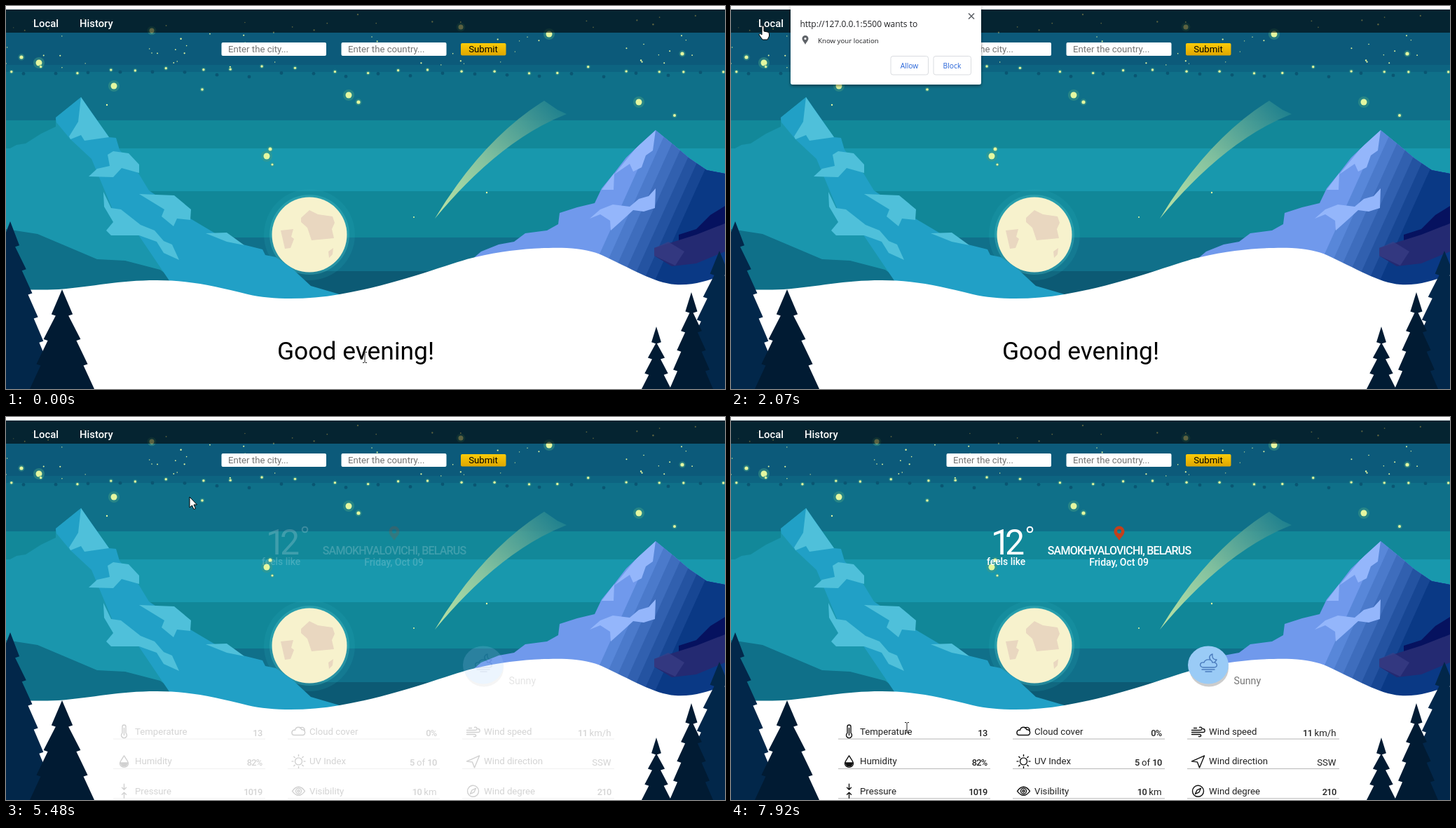
An HTML page for the animation above (8 s loop, 1026 by 546 pixels).

```html
<!DOCTYPE html>
<html lang="en">
<head>
<meta charset="utf-8">
<title>Weather</title>
<style>
html, body { margin: 0; width: 100%; height: 100%; overflow: hidden; background: #fff; }
svg { display: block; width: 1026px; height: 546px; font-family: Roboto, sans-serif; }
.ui { font-size: 13.2px; }
.nav { font-size: 14.8px; font-weight: 500; fill: #fff; }
.hint { fill: #757575; }
.mid { text-anchor: middle; }
.end { text-anchor: end; }
.num { font-size: 12.8px; font-weight: 500; letter-spacing: -.7px; }
.icon { fill: none; stroke: #111; stroke-width: 1.4; stroke-linecap: round; stroke-linejoin: round; }
.icon .full { fill: #111; }
#ask { font-family: "Open Sans", sans-serif; }
#ask .btn { fill: #fff; stroke: #dadce0; }
#ask .blue { fill: #2563d8; font-size: 10.3px; }
</style>
</head>
<body>
<svg viewBox="0 0 1026 546">
  <defs>
    <linearGradient id="gold" x2="0" y2="1"><stop stop-color="#fccb08"/><stop offset="1" stop-color="#dfa600"/></linearGradient>
    <linearGradient id="tail" gradientUnits="userSpaceOnUse" x1="612" y1="303" x2="790" y2="140">
      <stop stop-color="#dcf6a8"/><stop offset=".45" stop-color="#97c99c"/><stop offset="1" stop-color="#1f828f"/>
    </linearGradient>
    <clipPath id="peak"><path d="M664 362L678 350 703 340 725 336 741 324 772 320 788 311 790 295 815 287 840 281 850 260 868 238 885 216 905 197 927 177 955 200 975 217 1000 234 1026 239V400H664Z"/></clipPath>
    <filter id="soft" x="-10%" y="-10%" width="120%" height="130%"><feDropShadow dx="0" dy="2" stdDeviation="2" flood-opacity=".45"/></filter>
  </defs>

  <g id="sky"></g>
  <g id="stars"></g>
  <path d="M612 303Q680 190 768 135L787 148 800 154Q705 191 612 303Z" fill="url(#tail)" opacity=".85"/>

  <!-- moon -->
  <circle cx="433" cy="326" r="65" fill="#2aa6b4" opacity=".18"/>
  <circle cx="433" cy="326" r="57" fill="#48bcc6" opacity=".35"/>
  <circle cx="433" cy="326" r="53.5" fill="#f7f2cd"/>
  <path fill="#e9d7c0" d="M421 302L433 291 445 297 466 300 469 309 465 318 468 331 436 334 430 316 421 308ZM392 320L410 318 407 329 411 332 406 345 398 346ZM460 350L467 345 466 354 461 359Z"/>

  <!-- left range -->
  <path fill="#1a96ad" d="M0 206L15 198 28 196 50 182 71 172 71 159 107 130 250 420H0Z"/>
  <path fill="#0f7089" d="M0 318L45 325 97 347 130 361 170 363 220 376 245 394V420H0Z"/>
  <path fill="#21a0c6" d="M107 130L71 159 72 166 92 190 122 218 152 290 190 328 234 393 330 430H480L476 411 435 399 408 374 385 358 370 355 366 347 330 338 300 325 263 303 204 263 190 240 162 205 157 188 147 187Z"/>
  <path fill="#4fc0da" d="M107 130L118 146 147 187 112 192 107 184 92 190 90 186 103 165ZM118 243L130 232 148 228 145 212 153 207 175 210 190 226 190 238 165 231 153 244ZM139 265L150 288 164 290 192 312 212 320 225 335 237 340 247 362 225 352 215 336 190 327 150 327 143 320 153 308 140 286ZM190 268L240 270 264 290 263 305 244 303 239 314 222 300 226 290ZM285 324L315 323 340 341 315 336Z"/>

  <!-- right range -->
  <g clip-path="url(#peak)">
    <path fill="#7099ec" d="M660 170H1026V400H660Z"/>
    <g id="slopes"></g>
    <path fill="#94b6fb" d="M927 177L923 206 913 213 907 230 895 236 890 225 868 240 905 195ZM833 303L848 290 866 283 890 286 903 275 917 271 927 260 926 288 910 293 895 291 882 303 863 320 862 306 848 297ZM850 262L868 238 867 262Z"/>
    <path fill="#06125f" d="M1026 285L1005 298 985 318 960 326V334L1000 350H1026Z"/>
    <path fill="#242a72" d="M925 345L950 337 985 326 1026 310V350L985 367 950 371 925 356Z"/>
    <path fill="#3a3f86" opacity=".7" d="M925 345L945 336 968 350 955 370 925 356Z"/>
  </g>

  <path fill="#fff" d="M0 404Q45 405 75 404C125 400 160 391 215 391C265 391 300 400 345 411C380 419 430 419 476 411C560 397 640 364 670 358C720 346 770 344 800 345C820 346 840 350 850 355C890 373 925 395 955 397C985 399 1010 388 1026 383V546H0Z"/>
  <g id="trees"></g>

  <!-- header -->
  <path fill="#fff" d="M0 0H1026V5H0Z"/>
  <path opacity=".6" d="M0 5H1026V38H0Z"/>
  <g class="nav"><text x="39" y="30">Local</text><text x="105" y="30">History</text></g>
  <g class="ui">
    <rect x="307.500" y="52" width="149.500" height="19" rx="2" fill="#fff"/>
    <rect x="478.500" y="52" width="150" height="19" rx="2" fill="#fff"/>
    <rect x="649" y="53" width="64.500" height="17.500" rx="2" fill="url(#gold)"/>
    <text class="hint" x="317" y="66">Enter the city...</text>
    <text class="hint" x="488" y="66">Enter the country...</text>
    <text class="mid" x="681" y="66">Submit</text>
  </g>

  <text id="hello" class="mid" x="499" y="504" font-size="35.4">Good evening!</text>

  <g id="report">
    <g fill="#fff" font-weight="500">
      <text x="371" y="196" font-size="50" font-weight="400" letter-spacing="-8">12</text>
      <circle cx="426.500" cy="160.500" r="3.800" fill="none" stroke="#fff" stroke-width="2"/>
      <text x="365" y="211" font-size="13.800">feels like</text>
      <text class="mid" x="554" y="196" font-size="16" letter-spacing="-.8">SAMOKHVALOVICHI, BELARUS</text>
      <text class="mid" x="553.500" y="212" font-size="14">Friday, Oct 09</text>
    </g>
    <path fill="#c2401c" fill-rule="evenodd" d="M554 176C551 171 546.500 168 546.500 163A7.500 7.500 0 0 1 561.500 163C561.500 168 557 171 554 176ZM554 160A3 3 0 1 0 554 166A3 3 0 1 0 554 160Z"/>
    <ellipse cx="682" cy="358" rx="28" ry="26.500" fill="#999" opacity=".5"/>
    <ellipse cx="681" cy="353.500" rx="29" ry="27" fill="#9acbf6"/>
    <path class="icon" style="stroke:#4a7bbd" d="M674 357C667 356 669 349 675 350C677 344 686 345 687 350C694 349 696 357 689 357ZM684 346C681 342 684 339 687 338C686 343 688 346 693 346L690 350M672 360H690M677 363H686"/>
    <text x="717.500" y="381" font-size="14.200" fill="#777">Sunny</text>
    <g id="rows"></g>
  </g>

  <g id="ask">
    <path fill="#fff" filter="url(#soft)" d="M85 0H357V109Q357 112 354 112H88Q85 112 85 109Z"/>
    <g fill="#202124">
      <text x="98.500" y="30" font-size="12">http://127.0.0.1:5500 wants to</text>
      <text x="124" y="53" font-size="9.700">Know your location</text>
    </g>
    <path fill="#5f6368" fill-rule="evenodd" d="M106 55C104 51 101.500 49 101.500 46.500A4.500 4.500 0 0 1 110.500 46.500C110.500 49 108 51 106 55ZM106 45A1.600 1.600 0 1 0 106 48.200A1.600 1.600 0 1 0 106 45Z"/>
    <path stroke="#5f6368" stroke-width="1.600" d="M339 10.500L347 18.500M347 10.500L339 18.500"/>
    <rect class="btn" x="228" y="71.500" width="53.500" height="26.500" rx="3"/>
    <rect class="btn" x="289" y="71.500" width="53.500" height="26.500" rx="3"/>
    <text class="mid blue" x="254.500" y="88.500">Allow</text>
    <text class="mid blue" x="315.500" y="88.500">Block</text>
  </g>

  <g id="pointer">
    <path id="beam" fill="none" stroke="#222" d="M-3 -7.500H-1L0 -6.500 1 -7.500H3M0 -6.500V6.500M-3 7.500H-1L0 6.500 1 7.500H3"/>
    <path id="arrow" fill="#fff" stroke="#000" d="M0 0V15L3.500 12 6 17.500 8.500 16.400 6 11H10.500Z"/>
    <path id="hand" fill="#fff" stroke="#000" stroke-linejoin="round" d="M-3 -8C-3 -10 0 -10 0 -8V-2L5 -1Q7.500 -1 7.500 2V5L5 10H-2L-7 3C-7 1 -5 1 -3 3Z"/>
  </g>
</svg>

<script>
const $ = id => document.getElementById(id);
const add = (id, html) => $(id).insertAdjacentHTML('beforeend', html);

// Sky bands: top and colour
[[0, '#0c5a7a'], [84, '#0d6481'], [94, '#0f7089'], [163, '#128899'], [203, '#1898ad'],
 [264, '#118798'], [330, '#10708a'], [378, '#0c5a74']].forEach(([y, c]) =>
  add('sky', `<rect y="${y}" width="1026" height="${546 - y}" fill="${c}"/>`));

const star = (x, y, r) => add('stars',
  `<circle cx="${x}" cy="${y}" r="${r * 1.8}" fill="#3f9a86" opacity="${r > 1.4 ? .5 : 0}"/>
   <circle cx="${x}" cy="${y}" r="${r}" fill="#e4f7a0"/>`);
[[47, 81, 4.5], [154, 114, 4.5], [489, 127, 4.5], [372, 214, 4.5], [903, 137, 4.5], [775, 40, 4.5],
 [208, 35, 3.5], [649, 30, 3.5], [22, 73, 2.6], [503, 137, 2.6], [965, 68, 2.6], [377, 204, 2.5],
 [954, 156, 2], [280, 119, 1.8], [380, 226, 1.6], [686, 266, 1.2], [144, 141, 1.2], [582, 301, 1]]
  .forEach(s => star(...s));

let seed = 7;
const rand = (a, b) => a + (b - a) * (seed = seed * 16807 % 2147483647) / 2147483647;
for (let i = 0; i < 75; i++) star(rand(0, 1026), rand(12, 88), rand(.6, 1.2));
for (let x = 5; x < 1026; x += 46) {
  add('stars', `<circle cx="${x + 20}" cy="${rand(93, 101)}" r="2.4" fill="#0a5672"/>`);
  star(x + rand(-8, 8), rand(86, 96), 1.7);
}

// Shaded slopes, each covering everything to its right
for (let i = 0; i < 7; i++) {
  const x = 930 + 16 * i;
  add('slopes', `<path fill="rgb(${88 - 13 * i} ${135 - 13 * i} ${217 - 14 * i})" d="M${x} 170L${x - 104} 400H1100V170Z"/>`);
}

// A fir: tiers widening downwards, with a notch under each
function tree(x, top, half, tiers, fill) {
  const h = 546 - top, right = [], left = [];
  for (let i = 1; i <= tiers; i++) {
    const w = half * (i / tiers) ** .8, y = top + h * i / tiers;
    right.push(`${x + w} ${y} ${x + w - 6} ${y + 2}`);
    left.unshift(`${x - w + 6} ${y + 2} ${x - w} ${y}`);
  }
  add('trees', `<path fill="${fill}" d="M${x} ${top}L${right.join(' ')} ${left.join(' ')}Z"/>`);
}
tree(6, 307, 62, 7, '#02274a');
tree(1018, 349, 56, 6, '#02274a');
tree(80, 404, 46, 4, '#011b33');
tree(928, 457, 21, 4, '#011b33');
tree(978, 408, 31, 5, '#011b33');

const num = s => `<tspan class="num">${s}</tspan>`;
[
  ['Temperature', num(13), '<path d="M-2.500 2V-7A2.500 2.500 0 0 1 2.500 -7V2A4 4 0 1 1 -2.500 2ZM0 -5V5"/>'],
  ['Cloud cover', num('0%'), '<path d="M-9 4C-11 -1 -7 -3 -5 -2C-4 -8 4 -7 4 -3C11 -3 10 5 6 5H-6C-8 5 -9 4 -9 4M2 -5C6 -8 10 -4 8 -1"/>'],
  ['Wind speed', num(11) + ' km/h', '<path d="M-9 -2H3C7 -2 6 -8 2 -6M-9 1H7C11 1 10 -4 7 -4M-9 4H2C5 4 5 8 1 7M-6 -5H-2"/>'],
  ['Humidity', num('82%'), '<path d="M0 -8C3 -3 6 0 6 3A6 5.500 0 0 1 -6 3C-6 0 -3 -3 0 -8Z"/><path class="full" d="M-5 2H5Q4 7 0 7T-5 2Z"/>'],
  ['UV Index', num(5) + ' of ' + num(10), '<circle r="5"/>' + [0, 45, 90, 135, 180, 225, 270, 315].map(a => `<path d="M7.500 0H9.500" transform="rotate(${a})"/>`).join('')],
  ['Wind direction', 'SSW', '<path d="M9 -8L-9 0 -1 1 2 9Z"/>'],
  ['Pressure', num(1019), '<path d="M0 -10V-2M-3 -5L0 -2 3 -5M0 10V2M-3 5L0 2 3 5"/>'],
  ['Visibility', num(10) + ' km', '<path d="M-9 0Q0 -12 9 0Q0 12 -9 0Z"/><circle r="4"/><circle r="1.500"/>'],
  ['Wind degree', num(210), '<circle r="8"/><path d="M4 -4L1.500 1.500 -4 4 -1.500 -1.500Z"/>']
].forEach(([label, value, icon], i) => {
  const x = 153 + i % 3 * 249, y = 448.5 + (i / 3 | 0) * 42.4;
  add('rows', `<g class="ui" transform="translate(${x} ${y})" fill="#222">
    <path d="M0 10.500H217" stroke="#b5b5b5"/>
    <g class="icon" transform="translate(15.500 0)">${icon}</g>
    <text x="31" y="4.500">${label}</text><text class="end" x="212.500" y="6">${value}</text></g>`);
});

// Progress from 0 to 1 in n held steps, the first at t0 and the last at t1
const steps = (t, t0, t1, n) => t < t0 ? 0 : Math.min(1, (Math.floor((t - t0) / (t1 - t0) * (n - 1) + .02) + 1) / n);
const ease = p => Math.sin(p * Math.PI / 2);

// Pointer moves: start, end, steps, bend and goal of each curve
const home = [512, 501];
const moves = [
  [700, 1370, 6, [170, 215], [47, 38]],
  [2480, 3420, 8, [150, 110], [273, 139]],
  [3560, 4100, 5, [295, 112], [255, 89]],
  [4800, 5200, 4, [256, 100], [262, 114]],
  [5890, 6310, 4, [330, 160], [413, 206]],
  [6450, 7500, 9, [560, 330], [231, 445]],
  [7650, 7920, 3, [190, 445], [251, 443]]
];

function pointerAt(t) {
  let pos = home;
  for (const [t0, t1, n, bend, goal] of moves) {
    if (t < t0) break;
    const p = ease(steps(t, t0, t1, n)), q = 1 - p;
    pos = pos.map((v, i) => q * q * v + 2 * p * q * bend[i] + p * p * goal[i]);
  }
  return pos;
}

function draw(t) {
  const [x, y] = pointerAt(t);
  const shape = y > 435 ? 'beam' : y < 45 ? 'hand' : 'arrow';
  $('pointer').setAttribute('transform', `translate(${x} ${y})`);
  for (const id of ['beam', 'arrow', 'hand']) $(id).style.display = id === shape ? '' : 'none';
  $('ask').style.opacity = steps(t, 1780, 2070, 3) - steps(t, 4380, 4520, 2);
  $('report').style.opacity = ease(steps(t, 5480, 6450, 8));
  $('hello').style.display = t < 5480 ? '' : 'none';
}

const start = performance.now();
(function tick() {
  draw((performance.now() - start) % 8000);
  requestAnimationFrame(tick);
})();
</script>
</body>
</html>
```
